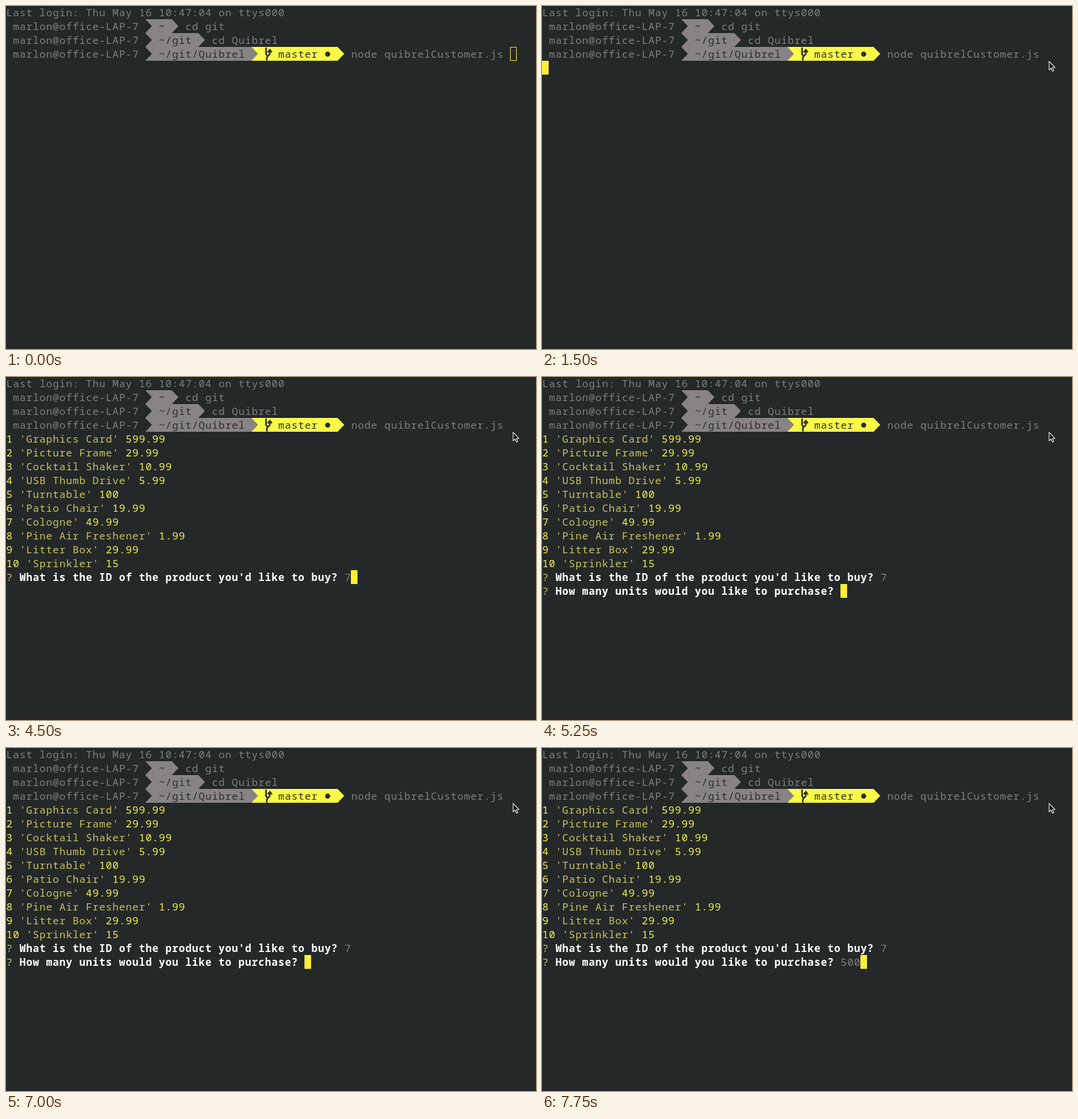
These frames come from a looping animation (879 px wide and 570 px high, 8 s). An HTML page:

```html
<!DOCTYPE html>
<html lang="en">
<head>
<meta charset="utf-8">
<title>Terminal shop</title>
<style>
  html, body { margin: 0; width: 100%; height: 100%; overflow: hidden; background: #242829; }
  svg { display: block; width: 879px; height: 570px; }
  text {
    font: 17px "Noto Sans Mono", "DejaVu Sans Mono", monospace;
    letter-spacing: calc(11px - .6em);
    white-space: pre;
  }
  .dim { fill: #7d7f7f; }
  .ink { fill: #2b2d2e; }
  .num { fill: #f5f542; }
  .str { fill: #c9c25a; }
  .ask { fill: #fff; font-weight: 700; }
  .grey { fill: #878387; }
  .gold { fill: #fafa48; }
</style>
</head>
<body>
<svg id="stage" viewBox="0 0 879 570">
  <rect width="879" height="570" fill="#242829"/>
  <rect y="566" width="879" height="4" fill="#272628"/>
  <g id="shell"></g>
  <g id="list"></g>
  <g id="second"></g>
  <text id="id" class="dim"></text>
  <text id="units" class="dim"></text>
  <rect id="caret" stroke="#fdee36"/>
  <path id="pointer" d="M1 1V15.2L4.3 12.2L6.6 17.2L8.8 16.2L6.6 11.2H10.8Z"
    fill="#1c1e1f" stroke="#eee" stroke-width="1.1" stroke-linejoin="round"/>
</svg>
<script>
const CELL = 11, ROW = 23, LOOP = 8000;
const $ = id => document.getElementById(id);
const colX = col => col * CELL;
const rowY = row => row * ROW - 1;

function add(parent, tag, attrs, content = '') {
  const el = document.createElementNS('http://www.w3.org/2000/svg', tag);
  for (const key in attrs) el.setAttribute(key, attrs[key]);
  el.textContent = content;
  parent.append(el);
  return el;
}

// Glyphs are a little narrower than a cell, so centre them in it
function place(el, col, row) {
  el.setAttribute('x', colX(col) + 0.4);
  el.setAttribute('y', rowY(row) + 18);
}

function write(parent, col, row, content, kind) {
  place(add(parent, 'text', { class: kind }, content), col, row);
}

// Prompt segment: notched on the left, pointed on the right
function ribbon(from, to, row, kind) {
  const l = colX(from), r = colX(to), y = rowY(row), mid = y + ROW / 2;
  const points = [l, y, r, y, r + CELL, mid, r, y + ROW, l, y + ROW, l + CELL, mid];
  add($('shell'), 'polygon', { class: kind, points: points.join(' ') });
}

function prompt(row, path) {
  const end = 24 + path.length;
  write($('shell'), 1, row, 'marlon@office-LAP-7', 'dim');
  ribbon(21, end, row, 'grey');
  write($('shell'), 23, row, path, 'ink');
  return end;
}

function buildShell() {
  const shell = $('shell');
  write(shell, 0, 0, 'Last login: Thu May 16 10:47:04 on ttys000', 'dim');
  write(shell, prompt(1, '~') + 2, 1, 'cd git', 'dim');
  write(shell, prompt(2, '~/git') + 2, 2, 'cd Quibrel', 'dim');
  // The grey segment overlaps the gold one
  ribbon(36, 50, 3, 'gold');
  prompt(3, '~/git/Quibrel');
  add(shell, 'path', {
    d: 'M431.3 69V80L434 83M437.5 74V79.5L432.5 85.5V90.5M434 77L437.5 72.8L441 77',
    fill: 'none', stroke: '#2b2d2e', 'stroke-width': 2.6
  });
  write(shell, 41, 3, 'master', 'ink');
  add(shell, 'circle', { cx: 533.5, cy: 80, r: 4.2, class: 'ink' });
  write(shell, 52, 3, 'node quibrelCustomer.js', 'dim');
}

function buildList() {
  const items = [
    ['Graphics Card', 599.99], ['Picture Frame', 29.99], ['Cocktail Shaker', 10.99],
    ['USB Thumb Drive', 5.99], ['Turntable', 100], ['Patio Chair', 19.99],
    ['Cologne', 49.99], ['Pine Air Freshener', 1.99], ['Litter Box', 29.99], ['Sprinkler', 15]
  ];
  items.forEach(([name, price], i) => {
    const id = String(i + 1), row = i + 4, col = id.length + 1;
    write($('list'), 0, row, id, 'num');
    write($('list'), col, row, `'${name}'`, 'str');
    write($('list'), col + name.length + 3, row, price, 'num');
  });
  question($('list'), 14, "What is the ID of the product you'd like to buy?");
  question($('second'), 15, 'How many units would you like to purchase?');
}

function question(parent, row, content) {
  write(parent, 0, row, '?', 'str');
  write(parent, 2, row, content, 'ask');
}

// Each step changes only the listed values
const steps = [
  { at: 0, caret: [76, 3], hollow: true, pointer: null, list: false, second: false, id: '', units: '' },
  { at: 250, pointer: [847, 101] },
  { at: 500, pointer: [840, 91] },
  { at: 750, hollow: false },
  { at: 1500, caret: [0, 4] },
  { at: 1750, caret: [51, 14], list: true },
  { at: 4500, caret: [52, 14], id: '7' },
  { at: 5250, caret: [45, 15], second: true },
  { at: 6250, caret: [46, 15], units: '5' },
  { at: 7000, caret: [45, 15], units: '' },
  { at: 7500, caret: [46, 15], units: '5' },
  { at: 7750, caret: [48, 15], units: '500' }
];

const show = (id, on) => { $(id).style.display = on ? '' : 'none'; };

function draw(time) {
  const s = Object.assign({}, ...steps.filter(step => step.at <= time));
  show('list', s.list);
  show('second', s.second);
  show('pointer', s.pointer);
  if (s.pointer) $('pointer').setAttribute('transform', `translate(${s.pointer})`);
  $('id').textContent = s.id;
  $('units').textContent = s.units;
  const caret = $('caret');
  caret.setAttribute('x', colX(s.caret[0]) + 0.5);
  caret.setAttribute('y', rowY(s.caret[1]) + 0.5);
  caret.setAttribute('fill', s.hollow ? 'none' : '#fdee36');
}

buildShell();
buildList();
place($('id'), 51, 14);
place($('units'), 45, 15);
$('caret').setAttribute('width', CELL - 1);
$('caret').setAttribute('height', ROW - 1);

const start = performance.now();
function tick() {
  draw((performance.now() - start) % LOOP);
  requestAnimationFrame(tick);
}
tick();
</script>
</body>
</html>
```
